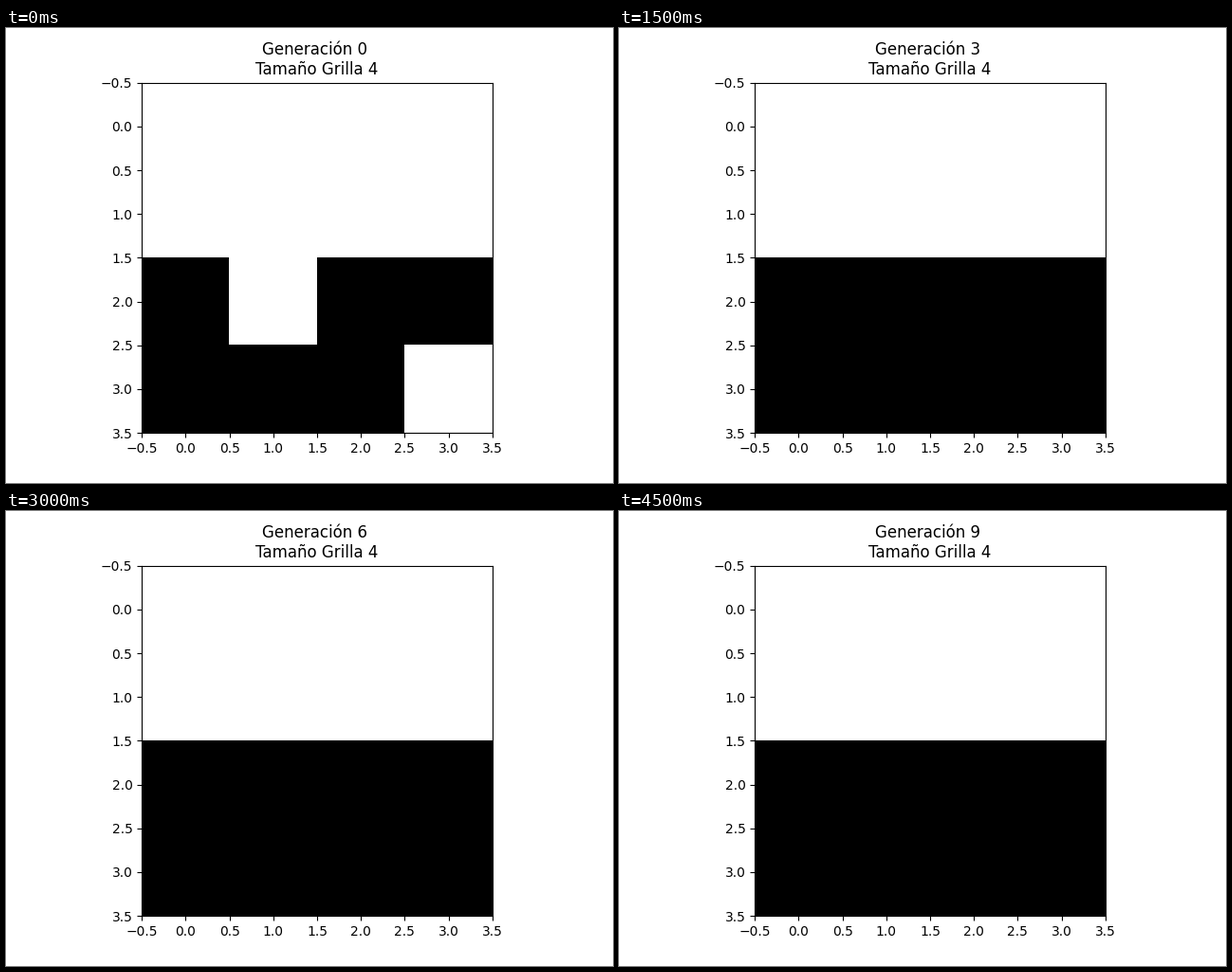
These frames come from a looping animation (640x480 px, 5 s). A matplotlib script:

```python
import numpy as np
import matplotlib.pyplot as plt
from matplotlib.animation import FuncAnimation

SIZE = 4
GENERATIONS = 10
START = np.array([
    [0, 0, 0, 0],
    [0, 0, 0, 0],
    [1, 0, 1, 1],
    [1, 1, 1, 0],
])


def evolve(grid):
    """Each cell joins the majority of its side neighbours; ties keep it."""
    spin = np.pad(2 * grid - 1, 1)
    votes = (spin[:-2, 1:-1] + spin[2:, 1:-1]
             + spin[1:-1, :-2] + spin[1:-1, 2:] + spin[1:-1, 1:-1])
    return np.where(votes == 0, grid, votes > 0).astype(int)


history = [START]
while len(history) < GENERATIONS:
    history.append(evolve(history[-1]))

fig, ax = plt.subplots(figsize=(6.4, 4.8), dpi=100)
image = ax.imshow(START, cmap="binary", vmin=0, vmax=1,
                  interpolation="nearest")
title = ax.set_title("")


def update(n):
    image.set_data(history[n])
    title.set_text(f"Generación {n} \nTamaño Grilla {SIZE}")
    return image, title


anim = FuncAnimation(fig, update, frames=GENERATIONS, interval=500,
                     repeat=True, repeat_delay=0)
plt.show()
```
